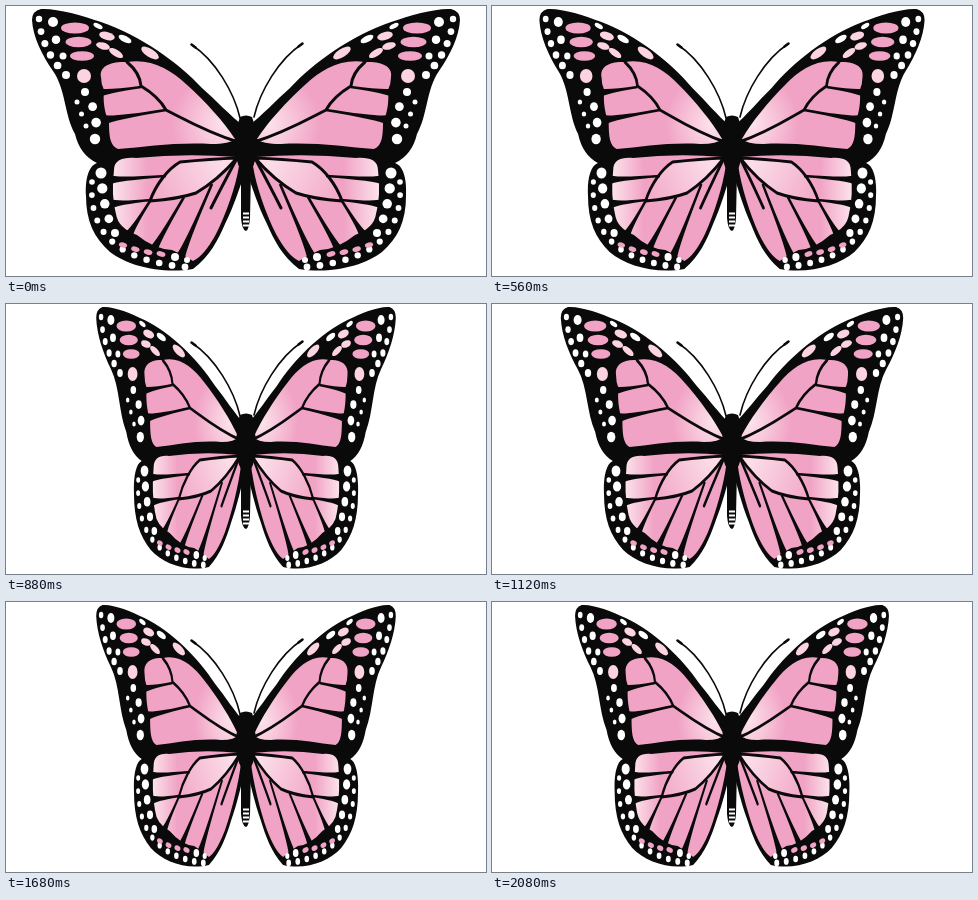
An HTML page for the animation above (2160 ms loop, 480 px wide and 270 px high).

```html
<!DOCTYPE html>
<html lang="en">
<head>
<meta charset="utf-8">
<title>Butterfly</title>
<style>
  html, body { margin: 0; width: 100%; height: 100%; overflow: hidden; background: #fff; }
  svg { display: block; width: 100vw; height: 100vh; }
  .ink { fill: #0b0a0b; }
  .pink { fill: #f1a3c5; }
  .pale { fill: #fbd3e1; }
  .white { fill: #fff; }
  .line { fill: none; stroke: #0b0a0b; stroke-width: 3; stroke-linecap: round; stroke-linejoin: round; }
</style>
</head>
<body>
<svg viewBox="0 0 480 270">
  <defs>
    <radialGradient id="root" gradientUnits="userSpaceOnUse" cx="218" cy="118" r="52">
      <stop offset="0" stop-color="#fce4ec"/><stop offset=".4" stop-color="#f8cadc"/><stop offset="1" stop-color="#f1a3c5"/>
    </radialGradient>
    <linearGradient id="rim" gradientUnits="userSpaceOnUse" x1="106" y1="0" x2="142" y2="0">
      <stop offset="0" stop-color="#fce4ec"/><stop offset="1" stop-color="#f1a3c5"/>
    </linearGradient>
    <linearGradient id="middle" gradientUnits="userSpaceOnUse" x1="150" y1="190" x2="215" y2="155">
      <stop offset="0" stop-color="#f3acca"/><stop offset="1" stop-color="#fbdde8"/>
    </linearGradient>

    <g id="wing">
      <path class="ink" d="M240 122C222 108 211 95 196 82C172 56 135 30 95 16C75 9 50 2 35 3Q26 5 26 14C27 31 36 49 47 65C60 84 58 108 69 128Q74 149 91 157C82 160 79 175 80 190C80 215 88 232 104 246C122 260 155 268 187 263C204 250 212 234 219 218C228 200 233 183 240 164Z"/>
      <!-- Coloured panes; the veins below divide them into cells. -->
      <path fill="url(#root)" d="M95 71C93 60 105 55 121 56C145 52 165 64 180 78C200 96 218 116 229 133Q224 138 205 138C170 136 140 141 112 143C104 140 103 130 103 116C98 106 97 94 98 84Q95 78 95 71Z"/>
      <path fill="url(#rim)" d="M108 164C108 154 117 151 130 152Q180 147 230 151L233 160C230 180 220 208 210 228Q198 250 187 255Q178 249 166 244Q148 243 131 229Q112 222 110 208Q105 190 108 164Z"/>
      <path class="line" fill-rule="evenodd" style="fill:url(#middle)" d="M231 152Q205 153 174 156C162 163 150 178 144 195Q172 193 190 187Q212 174 231 152Z"/>
      <path class="line" d="M232 136C200 126 178 113 160 104C154 93 145 86 135 80Q134 67 121 56M230 154Q214 184 205 202"/>
      <g id="veins"></g>
      <g id="spots"></g>
    </g>
  </defs>

  <g id="wings">
    <use href="#wing"/>
    <use href="#wing" transform="translate(480 0) scale(-1 1)"/>
  </g>

  <g id="antenna">
    <path class="line" style="stroke-width:1.600" d="M234 112C228 86 209 54 186 39"/>
    <path class="line" style="stroke-width:2.600" d="M185.500 38.500l4 3"/>
  </g>
  <use href="#antenna" transform="translate(482 -1) scale(-1 1)"/>
  <path class="ink" d="M234 111Q240 108 246 111L248 117L246 122Q251 130 250 146Q249 158 245 165L244 212Q243 224 240 225Q236 224 235 212L235 165Q231 158 230 146Q229 130 234 122L232 117Z"/>
  <path d="M240 206.500v15" stroke="#fff" stroke-width="6" stroke-dasharray="2 2"/>
</svg>
<script>
const FRAME = 80, FRAMES = 27, FLAP = 8, FLAPS = 3, FOLD = 0.4, AXIS = 240;
const SVG_NS = 'http://www.w3.org/2000/svg';

function make(tag, attrs) {
  const node = document.createElementNS(SVG_NS, tag);
  for (const key in attrs) node.setAttribute(key, attrs[key]);
  return node;
}

const mix = (a, b, t) => a + (b - a) * t;

// A vein that widens towards the wing's rim, which rounds the cells beside it.
function vein(x1, y1, x2, y2) {
  const length = Math.hypot(x2 - x1, y2 - y1);
  const nx = (y1 - y2) / length, ny = (x2 - x1) / length;
  const at = (t, w) => `${mix(x1, x2, t) + nx * w} ${mix(y1, y2, t) + ny * w}`;
  const d = `M${at(0, 1.3)}Q${at(0.85, 1.3)} ${at(1, 5)}L${at(1, -5)}Q${at(0.85, -1.3)} ${at(0, -1.3)}Z`;
  document.getElementById('veins').append(make('path', { class: 'ink', d }));
}

// Evenly spaced spots along a curve, growing or shrinking from one end to the other.
function spotRow(color, d, count, from, to = from, ratio = 1, tilt = 0) {
  const curve = make('path', { d });
  const length = curve.getTotalLength();
  for (let i = 0; i < count; i++) {
    const t = count > 1 ? i / (count - 1) : 0;
    const { x, y } = curve.getPointAtLength(t * length);
    const rx = mix(from, to, t);
    document.getElementById('spots').append(make('ellipse', {
      class: color, rx, ry: rx * ratio, transform: `translate(${x} ${y}) rotate(${tilt})`
    }));
  }
}

// Forewing, then hindwing from top to bottom.
vein(135, 81, 92, 87);
vein(160, 104, 98, 114);
vein(160, 170, 102, 174);
vein(145, 194, 105, 198);
vein(144, 195, 122, 230);
vein(178, 191, 146, 246);
vein(206, 178, 174, 252);

spotRow('white', 'M33 13Q36 45 60 69', 6, 3.2, 4);
spotRow('white', 'M47 16Q49 38 57 50', 3, 5, 3.5);
spotRow('white', 'M79 86Q94 108 89 133', 4, 4, 5.2);
spotRow('white', 'M71 96L80 120', 3, 2.5);
spotRow('white', 'M92 20L119 33', 2, 5, 7, 0.45, 27);
spotRow('pink', 'M69 22L76 50', 3, 14, 12, 0.4);
spotRow('pale', 'M101 30L97 40', 2, 8, 7, 0.5, 15);
spotRow('pale', 'M110 47L144 47', 2, 8, 10, 0.42, 32);
spotRow('pale', 'M78 70', 1, 7);
spotRow('white', 'M86 176C83 225 108 254 179 261', 12, 2.8, 3.4);
spotRow('white', 'M95 167Q97 205 109 227', 5, 5.5, 4);
spotRow('pink', 'M117 239Q135 246 155 248', 4, 4.2, 4.5, 0.6, 15);
spotRow('white', 'M169 251L181 254', 2, 4, 3);

// Even flaps, then a quicker closing stroke that is cut off by the loop.
function spread(step) {
  const rest = step - FLAP * FLAPS;
  if (rest >= 0) return 1 - FOLD * rest / 3;
  const phase = step % FLAP;
  return 1 - FOLD * Math.min(phase, FLAP - phase) / (FLAP / 2);
}

const wings = document.getElementById('wings');
const start = performance.now();
function draw(now) {
  const step = Math.floor(Math.max(0, now - start) / FRAME) % FRAMES;
  wings.setAttribute('transform', `translate(${AXIS} 0) scale(${spread(step)} 1) translate(${-AXIS} 0)`);
  requestAnimationFrame(draw);
}
draw(start);
</script>
</body>
</html>
```
